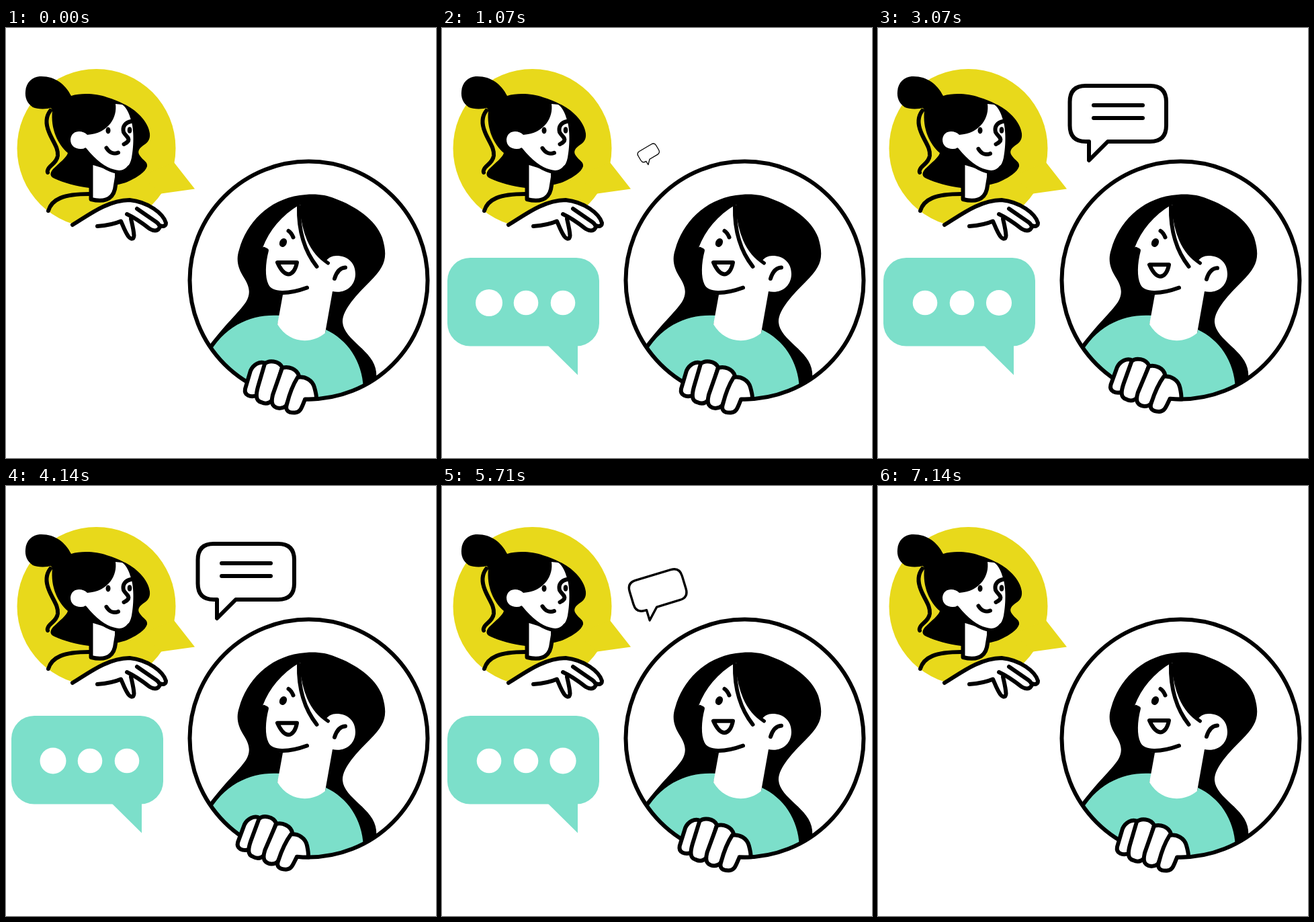
Write an HTML page with a canvas that moves like this. It is 640x640 px and loops after 7210 ms.

```html
<!DOCTYPE html>
<html lang="en">
<head>
<meta charset="utf-8">
<title>Chat</title>
<style>
html, body { margin: 0; width: 100%; height: 100%; overflow: hidden; background: #fff; }
canvas { display: block; width: 640px; height: 640px; }
</style>
</head>
<body>
<canvas id="stage" width="640" height="640"></canvas>
<script>
const LOOP = 7210;
const YELLOW = '#e8d91b', TEAL = '#7cdfca', BLACK = '#000', WHITE = '#fff';
const RING = { x: 450.5, y: 375.5, r: 177 };
const ctx = document.getElementById('stage').getContext('2d');
ctx.lineCap = ctx.lineJoin = 'round';

const clamp = v => Math.min(1, Math.max(0, v));
const progress = (t, from, to) => clamp((t - from) / (to - from));
const wave = p => Math.sin(Math.PI * p) ** 2;
const pulse = (t, from, to) => wave(progress(t, from, to));

// Accelerates while growing, then plays the same curve backwards.
function grow(t, inFrom, inTo, outFrom, outTo) {
  const p = t < outFrom ? progress(t, inFrom, inTo) : 1 - progress(t, outFrom, outTo);
  return p ** 1.55;
}

function fill(d, color) {
  ctx.fillStyle = color;
  ctx.fill(new Path2D(d));
}

function line(d, width = 6) {
  ctx.strokeStyle = BLACK;
  ctx.lineWidth = width;
  ctx.stroke(new Path2D(d));
}

function oval(x, y, rx, ry, color, turn = 0) {
  ctx.fillStyle = color;
  ctx.beginPath();
  ctx.ellipse(x, y, rx, ry, turn, 0, Math.PI * 2);
  ctx.fill();
}

function ringArc(from, to) {
  ctx.beginPath();
  ctx.arc(RING.x, RING.y, RING.r, from, to);
}

function shifted(dx, dy, draw) {
  ctx.save();
  ctx.translate(dx, dy);
  draw();
  ctx.restore();
}

// Scales from an anchor, tilting to the left while small.
function popped(x, y, size, draw) {
  if (size <= 0) return;
  ctx.save();
  ctx.translate(x, y);
  ctx.rotate(-39 * Math.PI / 180 * (1 - size));
  ctx.scale(size, size);
  ctx.translate(-x, -y);
  draw();
  ctx.restore();
}

function drawGuest(t) {
  oval(134.5, 179, 118, 118, YELLOW);
  fill('M250 200 L281 239.500 L231 246.500 L200 220 Z', YELLOW);

  // Hair
  fill('M67 119 C60 121 46 121 40 118 C31 112 28 103 29 94 C30 81 39 73 50 72 C72 71 88 83 97 101 ' +
    'C114 96 135 98 150 103 C160 106 168 109 175 113 C193 121 212 139 214 157 C215 167 210 171 204 175 ' +
    'C197 180 195 185 200 191 C204 197 211 199 210 206 C207 215 195 222 185 227 C178 231 170 232 163 234 ' +
    'L124 238 C105 236 85 230 72 224 C65 221 65 216 70 210 C80 200 90 193 92 186 C77 173 66 150 69 123 Z', BLACK);
  line('M66 123 C59 132 59 143 64 155 C70 170 78 178 77 190 C76 199 68 203 64 208 C62 211 61 213 62 215');

  // Neck
  const neck = 'M126.500 200 L126.500 255 C143 259 158 257 162 240 L165 222 L165 212 Z';
  fill(neck, WHITE);
  line(neck);

  // Face
  fill('M163 113 C166 132 153 157 121 159 C113 151 97 152 96 166 C96 178 107 182 118 179 ' +
    'C131 195 145 208 160 212 C175 215 184 208 187 193 C191 172 190 148 186 137 C183 126 179 118 173 114 Z', WHITE);
  line('M118 181 C131 197 145 209 160 213 C170 216 178 214 183 207', 5);
  oval(152, 152.500, 3.5, 5, BLACK);
  oval(184, 152, 3.3, 4.700, BLACK);
  line('M186 139 C177 141 173 147 175 155 C178 161 184 163 182 168 C180 171 178 172 175.500 173');
  shifted(0, 1.5 * wave(t / LOOP), () => line('M149.500 178.500 C154 186 161 188 167 185.500'));

  // Arm and hand
  line('M63 272 C68 255 85 247 124 247');
  fill('M99 293 C125 277 150 257 184 256 C212 259 234 276 239 290 C239 296 234 297 229 296 ' +
    'C227 303 219 303 214 299 L188 284 L191 309 C190 315 186 315 182 310 L171 288 L166 302 L99 302 Z', WHITE);
  line('M99 293 C125 277 150 257 184 256 C212 259 234 276 238 290 C238 295 234 296 229 294');
  line('M195 269 L224 289 C228 292 230 296 228 298 C225 303 219 302 214 299 C205 292 195 284 180 277');
  line('M136 295 C150 294 163 291 171 287.500 C174 294 177 303 182 310 C186 315 190 315 190.500 309 C190 300 188 293 186 284');
}

function drawHost(sway) {
  ctx.save();
  ringArc(0, Math.PI * 2);
  ctx.clip();

  // Hair
  fill('M437 249 C455 246 475 247 490 254 C520 265 550 285 560 312 C569 342 564 355 542 377 ' +
    'C522 397 500 420 501 438 C503 465 548 480 551 512 L552 530 L530 560 L300 560 L300 476 ' +
    'C325 442 347 423 357 408 C365 395 362 385 355 373 C345 358 342 345 347 330 C358 290 390 256 437 249 Z', BLACK);

  // Shirt
  fill('M300 489 C325 441 368 425 408 428 L404 441 L475 454 L476 449 C508 464 530 495 532 536 L532 560 L300 560 Z', TEAL);

  // Face and neck
  fill('M437 263 C410 279 392 301 382 327 L390 330 C385 350 384 372 390 383 C394 392 402 396 412 397 ' +
    'L404 441 C421 470 455 471 475 454 L486 392 C505 396 520 384 520 366 C520 349 508 339 492 339 ' +
    'C485 339 480 342 477 346 C452 333 443 302 439 264 Z', WHITE);
  ctx.restore();

  line('M384 329 L388 331 C383 350 382 371 388 383 C395 398 422 396 448 386.500');
  line('M436 266 C435 302 445 333 462.500 355');
  line('M439 266 C443 302 452 333 479.500 350', 5);
  oval(412.5, 319.5, 5.3, 6.8, BLACK, 0.45);
  line('M420.500 302 C424 304 426 308 427.500 311.500');
  shifted(0, sway, () => line('M489 373 C492 363 497 357 505 356.500'));
  shifted(0, sway * 4, () => line('M404 349 L433 349 C431 360 426 366.500 420 366.500 C413 366 408 358 404 349 Z'));

  ctx.lineWidth = 6;
  ringArc(0, Math.PI * 2);
  ctx.stroke();
}

const FINGERS = [
  'M386 499 C378 495 368 501 364 510 L356 537 C354 547 364 550 373 547',
  'M385 500 C391 494 406 495 411 505 L397 553 C392 559 386 560 380 557 C371 555 372 545 375 534 Z',
  'M411 506 C420 503 433 507 436 518 L417 562 C412 567 404 567 399 563 C394 559 396 550 397 546 Z',
  'M445 553 C440 564 439 572 430 572.500 C420 573 415 569 418 560 C421 548 427 531 434 520 ' +
  'C445 518 456 524 459 535 C461 542 462 547 462 551'
];

// The gripping hand slides along the ring.
function drawGrip(sway) {
  ctx.save();
  ctx.translate(RING.x, RING.y);
  ctx.rotate(4.1 * Math.PI / 180 * sway);
  ctx.translate(-RING.x, -RING.y);
  for (const finger of FINGERS) {
    fill(finger, WHITE);
    line(finger);
  }
  ringArc(1.5, 1.6);
  ctx.stroke();
  ctx.restore();
}

function drawTypingBubble(t) {
  popped(208, 528, grow(t, 0, 840, 6230, 7140), () => {
    ctx.fillStyle = TEAL;
    ctx.beginPath();
    ctx.roundRect(8, 342, 226, 131.5, 34);
    ctx.fill();
    fill('M155 470 L202 516.500 L202 470 Z', TEAL);
    const beats = [
      pulse(t, 760, 1500) + pulse(t, 3500, 4420),
      pulse(t, 1520, 2440) + pulse(t, 4600, 5450),
      pulse(t, 2440, 3250) + pulse(t, 5450, 6250)
    ];
    beats.forEach((beat, i) => {
      const r = 18.3 + 1.8 * beat;
      oval(70 + 55 * i, 409, r, r, WHITE);
    });
  });
}

function drawTextLine(y, size) {
  if (size <= 0) return;
  ctx.save();
  ctx.translate(318, y);
  ctx.scale(size, 1);
  line('M3 0 H76');
  ctx.restore();
}

function drawTextBubble(t) {
  popped(306.5, 206, grow(t, 720, 1665, 5478, 6240), () => {
    const shape = 'M309 86 H405 Q429 86 429 110 V145 Q429 169 405 169 H342 L314 197 V169 H309 Q285.500 169 285.500 145 V110 Q285.500 86 309 86 Z';
    fill(shape, WHITE);
    line(shape);
    drawTextLine(115, grow(t, 1665, 2200, 4150, 4720));
    drawTextLine(134, grow(t, 2350, 2950, 4720, 5440));
  });
}

function draw(t) {
  const sway = t < 3800
    ? wave(progress(t, 1000, 3800) / 2)
    : wave((1 - progress(t, 3800, 6500)) / 2);
  ctx.fillStyle = WHITE;
  ctx.fillRect(0, 0, 640, 640);
  drawGuest(t);
  drawHost(sway);
  drawGrip(sway);
  drawTypingBubble(t);
  drawTextBubble(t);
}

const start = performance.now();
function tick() {
  draw((performance.now() - start) % LOOP);
  requestAnimationFrame(tick);
}
tick();
</script>
</body>
</html>
```
